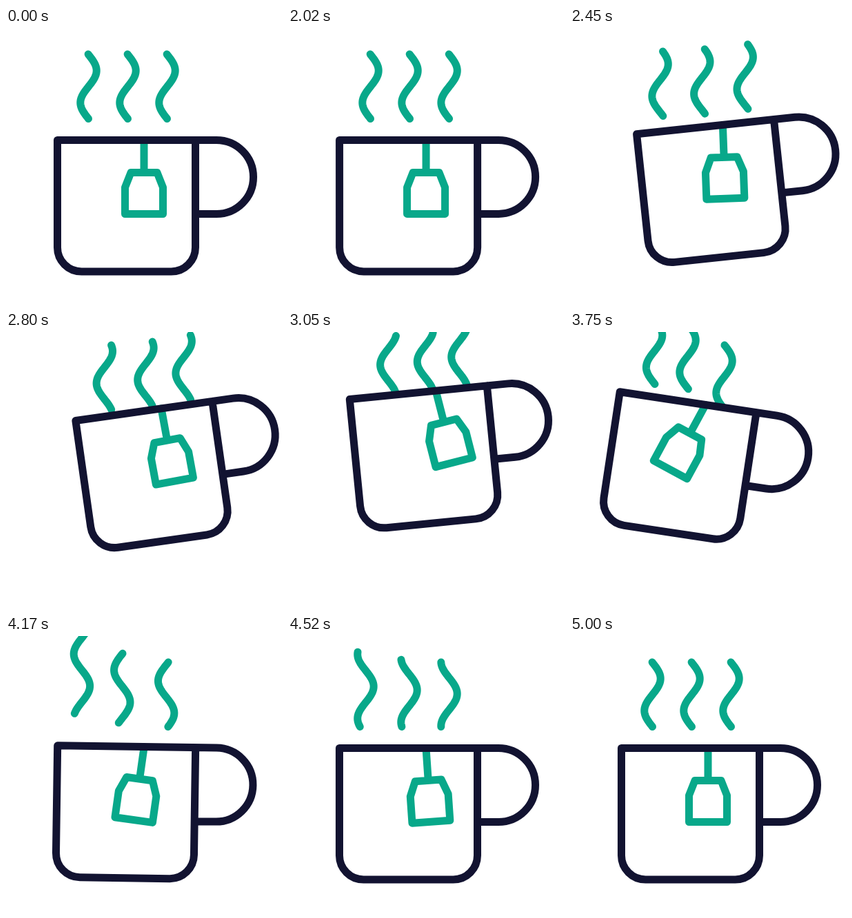
Write an HTML page with a canvas that moves like this. It is 400 px wide and 400 px high and loops after 5200 ms.

```html
<!DOCTYPE html>
<html lang="en">
<head>
<meta charset="utf-8">
<title>Tea cup</title>
<style>
  html, body { margin: 0; width: 100%; height: 100%; overflow: hidden; background: #fff; }
  canvas { display: block; width: 100vw; height: 100vh; }
</style>
</head>
<body>
<canvas id="stage"></canvas>
<script>
const LOOP = 5200, SIZE = 400, LINE = 11;
const DARK = '#121331', GREEN = '#08a88a';
const PIVOT = { x: 218, y: 257 };
const RIM = 162.5, HANG = 200;
const WAVE = { length: 93, width: 11.7, top: 38, bottom: 131.5 };

const canvas = document.getElementById('stage');
const ctx = canvas.getContext('2d');
const scale = window.devicePixelRatio || 1;
canvas.width = canvas.height = SIZE * scale;

// Smooth curve through [time, value] keys, flat at the ends and at every peak.
function track(...keys) {
  const last = keys.length - 1;
  const slope = i => (keys[i + 1][1] - keys[i][1]) / (keys[i + 1][0] - keys[i][0]);
  const tangents = keys.map((k, i) => {
    if (i === 0 || i === last) return 0;
    const a = slope(i - 1), b = slope(i);
    return a * b <= 0 ? 0 : 2 * a * b / (a + b);
  });
  return t => {
    if (t <= keys[0][0]) return keys[0][1];
    if (t >= keys[last][0]) return keys[last][1];
    let i = 0;
    while (t > keys[i + 1][0]) i++;
    const [t0, v0] = keys[i], [t1, v1] = keys[i + 1];
    const d = t1 - t0, u = (t - t0) / d, w = 1 - u;
    return v0 * (1 + 2 * u) * w * w + v1 * u * u * (3 - 2 * u)
      + d * u * w * (tangents[i] * w - tangents[i + 1] * u);
  };
}

const cup = {
  x: track([2000, 0], [2660, 41], [3740, -18], [4250, 0]),
  y: track([2000, 0], [2800, -55], [3340, -98], [4240, 0]),
  turn: track([2000, 0], [2690, -8.4], [3350, -1.2], [3750, 8.6], [4270, 0])
};
const swing = track([2000, 0], [2420, 4], [3310, -12], [3770, 20], [4540, -4], [5000, 0]);

// The wave runs up two whole lengths; the lagging steams stretch as they settle.
const flow = track([2000, 0], [2800, -15], [3750, -94], [4170, -136], [5000, -2 * WAVE.length]);
const settle = track([3750, 0], [4170, 1], [4900, 0]);

// Each steam to the left follows the cup a little later and rises higher.
function makeSteam([peak, height], lag) {
  const home = 233.5 - 57 * lag;
  const drift = track([2000, 0], [2650 + 175 * lag, 26], [3740 + 255 * lag, -10], [4300 + 350 * lag, 0]);
  const rise = track([2000 + 100 * lag, 0], [peak, height], [4170 + 140 * lag, 0]);
  return t => {
    const x = home + drift(t);
    const bottom = WAVE.bottom - rise(t);
    const top = WAVE.top - rise(t) - 7 * lag * lag * settle(t);
    const phase = flow(t) - 10 * lag * settle(t);
    const path = new Path2D();
    for (let i = 0; i <= 60; i++) {
      const y = bottom + (top - bottom) * i / 60;
      path.lineTo(x - WAVE.width * Math.sin(2 * Math.PI * (bottom + phase - y) / WAVE.length), y);
    }
    return path;
  };
}
const steams = [[3220, 46], [3620, 54], [3740, 56]].map(makeSteam);

const cupPath = new Path2D(
  'M74.5 162.5H305a53.5 53.5 0 0 1 0 107H274.5' +
  'M74.5 162.5V318a35 35 0 0 0 35 35H239.5a35 35 0 0 0 35-35V162.5');
const tagPath = new Path2D(
  'M200 162.5V209.5M181 209.5H219L227.5 231V269.5H172.5V231Z');

function rotateAt(x, y, degrees) {
  ctx.translate(x, y);
  ctx.rotate(degrees * Math.PI / 180);
  ctx.translate(-x, -y);
}

function placeCup(t) {
  ctx.translate(cup.x(t), cup.y(t));
  rotateAt(PIVOT.x, PIVOT.y, cup.turn(t));
}

function resetView() {
  ctx.setTransform(scale, 0, 0, scale, 0, 0);
}

function stroke(color, path) {
  ctx.strokeStyle = color;
  ctx.stroke(path);
}

function draw(t) {
  resetView();
  ctx.fillStyle = '#fff';
  ctx.fillRect(0, 0, SIZE, SIZE);
  ctx.lineCap = ctx.lineJoin = 'round';
  ctx.lineWidth = LINE;

  // Steam stays above the rim
  ctx.save();
  placeCup(t);
  ctx.beginPath();
  ctx.rect(-SIZE, -2 * SIZE, 3 * SIZE, 2 * SIZE + RIM);
  resetView();
  ctx.clip();
  for (const steam of steams) stroke(GREEN, steam(t));
  ctx.restore();

  ctx.save();
  placeCup(t);
  ctx.save();
  rotateAt(HANG, RIM, swing(t));
  stroke(GREEN, tagPath);
  ctx.restore();
  stroke(DARK, cupPath);
  ctx.restore();
}

const start = performance.now();
function tick() {
  draw((performance.now() - start) % LOOP);
  requestAnimationFrame(tick);
}
tick();
</script>
</body>
</html>
```
